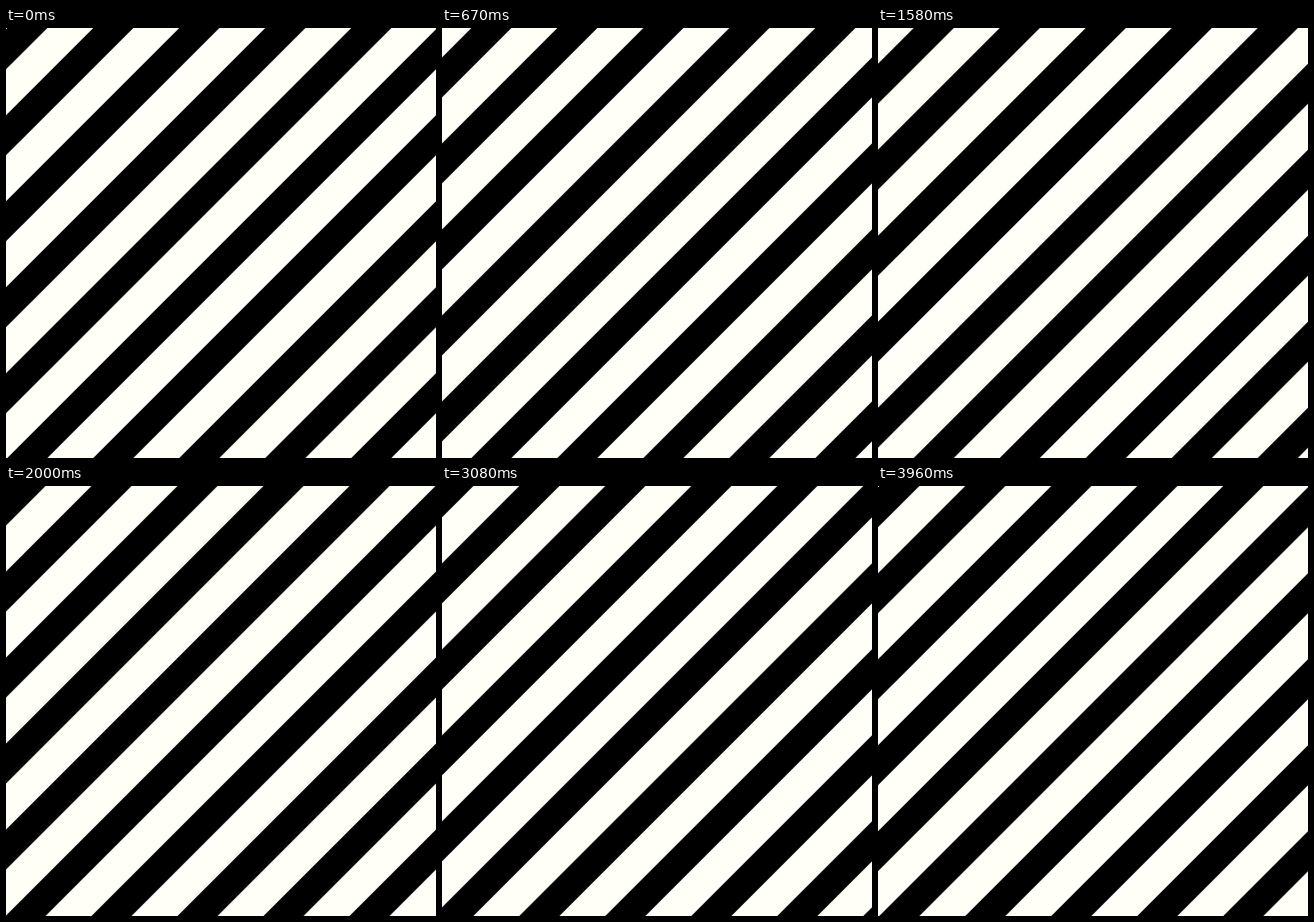
Write an HTML page that moves like this. It is 500 px wide and 500 px high and loops after 4 s.

```html
<!DOCTYPE html>
<html lang="en">
<head>
<meta charset="utf-8">
<title>Diagonal stripes</title>
<style>
  html, body {
    margin: 0;
    width: 100%;
    height: 100%;
    overflow: hidden;
    background: #fffff8;
  }
  svg {
    display: block;
    width: 100vw;
    height: 100vh;
  }
  /* Each dash of one very wide line is a stripe; 24 steps per second. */
  .stripes {
    stroke: #000;
    stroke-width: 2000;
    stroke-dasharray: 46.6 53.4;
    animation: slide 4s steps(96) -4.99ms infinite;
  }
  /* 95 steps cover four periods, so the last pose equals the first. */
  @keyframes slide {
    from { stroke-dashoffset: 0; }
    to { stroke-dashoffset: 404.2105; }
  }
</style>
</head>
<body>
<svg viewBox="0 0 500 500">
  <!-- Along this axis the coordinate equals x + y. -->
  <path class="stripes" d="M-98.5 0H1101.5" fill="none" transform="rotate(45) scale(.70710678)"/>
</svg>
</body>
</html>
```
